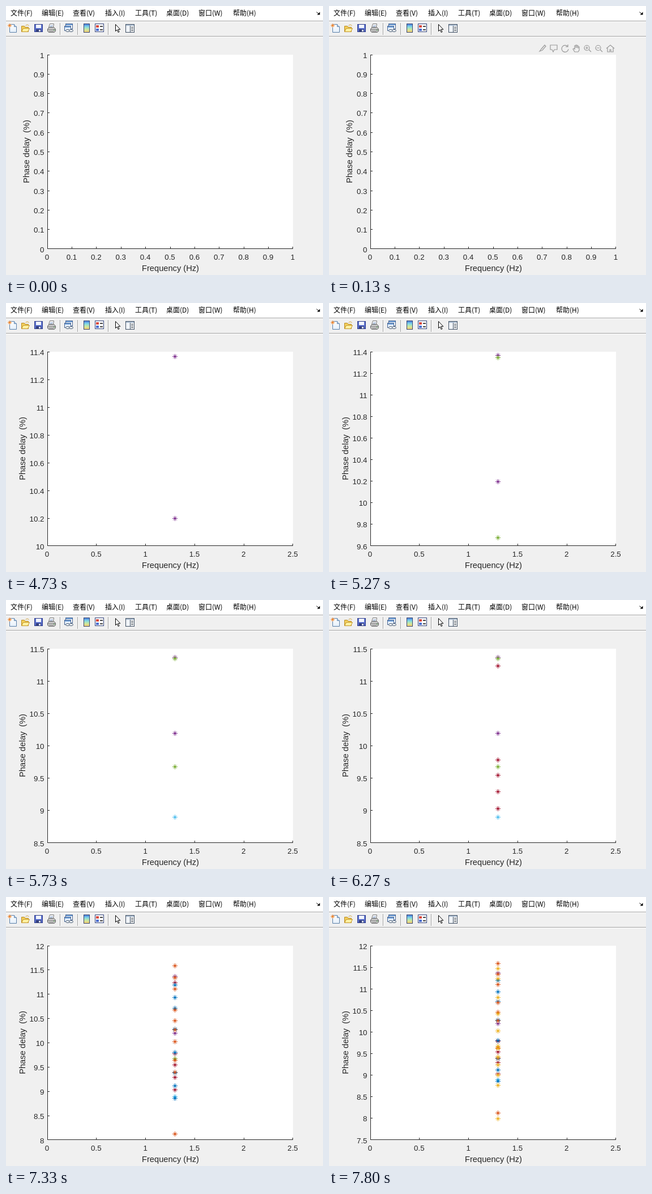
These frames come from a looping animation (560 by 475 pixels, 8000 ms). An HTML page with a canvas:

```html
<!DOCTYPE html>
<html lang="zh">
<head>
<meta charset="utf-8">
<title>Phase delay plot</title>
<style>
html, body { margin: 0; width: 100%; height: 100%; overflow: hidden; background: #f0f0f0; }
canvas { display: block; }
</style>
</head>
<body>
<canvas id="stage" width="560" height="475"></canvas>
<script>
const ctx = document.getElementById('stage').getContext('2d');
const LOOP = 8000;
const INK = '#262626';
const BOX = { x: 73, y: 86, w: 434, h: 343 };
const SANS = '"Liberation Sans", Arial, sans-serif';
const CJK = '"Noto Sans CJK SC", "Noto Sans CJK", "Noto Sans", sans-serif';

// Each series appears at its time and stays; lo, hi and step give the new y axis.
const SERIES = [
  { at: 4730, lo: 10, hi: 11.4, step: 0.2, color: '#7e2f8e', v: [11.367, 10.2] },
  { at: 5270, lo: 9.6, hi: 11.4, step: 0.2, color: '#77ac30', v: [11.35, 9.68] },
  { at: 5730, lo: 8.5, hi: 11.5, step: 0.5, color: '#4dbeee', v: [8.9] },
  { at: 6270, lo: 8.5, hi: 11.5, step: 0.5, color: '#a2142f', v: [11.24, 9.79, 9.55, 9.295, 9.033] },
  { at: 6800, lo: 8.5, hi: 11.5, step: 0.5, color: '#0072bd',
    v: [11.194, 10.94, 10.72, 10.284, 10.03, 9.812, 9.383, 9.121, 8.859] },
  { at: 7330, lo: 8, hi: 12, step: 0.5, color: '#d95319',
    v: [11.59, 11.347, 11.114, 10.682, 10.46, 10.274, 10.03, 9.644, 9.4, 8.128] },
  { at: 7800, lo: 7.5, hi: 12, step: 0.5, color: '#edb120',
    v: [11.475, 11.24, 10.806, 10.426, 10.03, 9.68, 9.626, 9.43, 9.245, 9.01, 8.77, 8] }
];

const MENU = [['文件(F)', 8], ['编辑(E)', 63], ['查看(V)', 118], ['插入(I)', 175],
  ['工具(T)', 228], ['桌面(D)', 283], ['窗口(W)', 340], ['帮助(H)', 401]];

function rect(x, y, w, h, fill, edge) {
  ctx.fillStyle = fill;
  ctx.fillRect(x, y, w, h);
  if (edge) {
    ctx.strokeStyle = edge;
    ctx.lineWidth = 1;
    ctx.strokeRect(x + 0.5, y + 0.5, w - 1, h - 1);
  }
}

function shape(d, fill, edge, width = 1) {
  const p = new Path2D(d);
  if (fill) { ctx.fillStyle = fill; ctx.fill(p); }
  if (edge) { ctx.strokeStyle = edge; ctx.lineWidth = width; ctx.stroke(p); }
}

function text(s, x, y, size, align = 'left', font = SANS, color = INK) {
  ctx.font = size + 'px ' + font;
  ctx.textAlign = align;
  ctx.fillStyle = color;
  ctx.fillText(s, x, y);
}

function gradient(y0, y1, ...colors) {
  const g = ctx.createLinearGradient(0, y0, 0, y1);
  colors.forEach((c, i) => g.addColorStop(i / (colors.length - 1), c));
  return g;
}

function drawMenu() {
  rect(0, 0, 560, 26, '#fff');
  for (const [label, x] of MENU) text(label, x, 17, 12, 'left', CJK, '#000');
  shape('M548.5 10.5L553 14.5', null, '#000');
  shape('M554.5 10.5V15.5H549.5Z', '#000');
}

function drawToolbar() {
  for (const y of [26, 53]) {
    rect(0, y, 560, 1, '#a0a0a0');
    rect(0, y + 1, 560, 1, '#fff');
  }
  for (const x of [95, 126, 180]) {
    rect(x, 30, 1, 21, '#a0a0a0');
    rect(x + 1, 30, 1, 21, '#fff');
  }

  // new page
  shape('M6.5 32.5H14.5L18.5 36.5V46.5H6.5Z', gradient(32, 47, '#fff', '#e4effa'), '#5a7fa8');
  shape('M14.5 32.5V36.5H18.5', '#c5dcf2', '#5a7fa8');
  shape('M3 34.5H10M6.5 31V38M4 32L9 37M9 32L4 37', null, '#ec8a38');

  // folder
  shape('M27.5 45.5V35.5H32.5L34 37.5H39.5V45.5Z', '#f3cf5c', '#b98a1c');
  shape('M27.5 45.5L30.5 39.5H41.5L38.5 45.5Z', '#fff0a0', '#c3952a');
  shape('M34.5 34.5Q37.5 31.5 40.5 34.5', null, '#d1a137');

  // disk
  rect(50, 32, 15, 14, '#5a6fcb', '#2c3a8c');
  rect(53, 33, 9, 6, '#f2f5fd');
  rect(53, 41, 9, 5, '#343f7c');
  rect(58, 42, 3, 3, '#dce3f4');

  // printer
  shape('M75.5 38L77.5 31.5H84.5L83.5 38Z', '#fff', '#777');
  shape('M78 34.5H83M77.5 36.5H82', null, '#8fa9cf');
  shape('M73.5 40.5L76.5 37.5H84.5L87.5 40.5V44.5L85 46.5H75.5L73.5 44.5Z', '#c4c4c4', '#606060');
  shape('M74 41.5H87M76 44.5H84', null, '#8a8a8a');
  rect(84, 42, 2, 1, '#3c9d3c');

  // linked windows
  rect(105, 31, 13, 10, '#fff', '#44618f');
  rect(106, 32, 11, 2, '#6f9fd8');
  rect(103, 35, 12, 9, '#e6f0fb', '#44618f');
  rect(104, 36, 10, 2, '#6f9fd8');
  ctx.strokeStyle = '#46586f';
  for (const x of [109, 115]) {
    ctx.beginPath();
    ctx.ellipse(x, 43.5, 3.5, 2, 0, 0, Math.PI * 2);
    ctx.fillStyle = '#eef2f6';
    ctx.fill();
    ctx.stroke();
  }

  // color bar
  rect(137, 31, 11, 16, gradient(32, 46, '#4a7de0', '#7fd8e6', '#c8e8a0', '#f8cf72'), '#38466e');

  // legend
  rect(157, 31, 16, 15, '#fff', '#35457d');
  rect(159, 34, 5, 4, '#d8473c');
  rect(159, 40, 5, 4, '#4b6fd0');
  rect(166, 35, 5, 2, '#4a4a4a');
  rect(166, 41, 5, 2, '#4a4a4a');

  // pointer
  shape('M193.5 32.5V44.5L196.2 42L198.2 46.5L200 45.7L198 41.3H201.8Z', '#fff', '#000');

  // inspector
  rect(211, 32, 16, 15, '#fff', '#3f4f63');
  rect(212, 33, 14, 2, '#aebfd2');
  rect(212, 35, 7, 11, '#f0f3f7');
  rect(219, 35, 1, 11, '#3f4f63');
  for (const y of [37, 40, 43]) rect(221, y, 4, 1, '#26313d');
}

// Hover tools above the axes, fading in two steps.
function drawHoverTools(t) {
  if (t < 130 || t >= 530) return;
  const icons = [
    'M3 13L6 9L12 2L14 4L8 11Z',
    'M2 2H14V10H9L7 14L5 10H2Z',
    'M13 5A6 6 0 1 0 14 9M13 1V5H9',
    'M5 14L2 9L4 8L5 9V3H7V7V2H9V7V3H11V8V5H13V11L11 14Z',
    'M11 7A4.5 4.5 0 1 1 2 7A4.5 4.5 0 1 1 11 7M10 10L14 14M4 7H9M6.5 4.5V9.5',
    'M11 7A4.5 4.5 0 1 1 2 7A4.5 4.5 0 1 1 11 7M10 10L14 14M4 7H9',
    'M1 8L8 2L15 8M3 7V14H7V10H9V14H13V7'
  ];
  ctx.save();
  ctx.globalAlpha = t < 400 ? 0.6 : 0.3;
  ctx.translate(369, 67);
  for (const d of icons) {
    shape(d, null, '#606060', 1.2);
    ctx.translate(20, 0);
  }
  ctx.restore();
}

function ticks(lo, hi, step) {
  const n = Math.round((hi - lo) / step);
  return Array.from({ length: n + 1 }, (_, i) => [i / n, String(+(lo + i * step).toFixed(1))]);
}

function drawAxes(y, xMax, xStep, labelX) {
  const bottom = BOX.y + BOX.h, right = BOX.x + BOX.w;
  rect(BOX.x, BOX.y, BOX.w, BOX.h, '#fff');
  rect(BOX.x, BOX.y, 1, BOX.h, INK);
  rect(BOX.x, bottom - 1, BOX.w, 1, INK);
  for (const [k, label] of ticks(0, xMax, xStep)) {
    const x = BOX.x + k * BOX.w;
    rect(Math.min(Math.floor(x), right - 1), bottom - 4, 1, 3, INK);
    text(label, x - 0.5, 448, 13.33, 'center');
  }
  for (const [k, label] of ticks(y.lo, y.hi, y.step)) {
    const py = Math.floor(bottom - k * BOX.h);
    rect(BOX.x + 1, Math.min(py, bottom - 1), 3, 1, INK);
    text(label, 67.5, py + 6, 13.33, 'right');
  }
  text('Frequency (Hz)', 290.5, 468, 14.67, 'center');
  ctx.save();
  ctx.translate(labelX, 257);
  ctx.rotate(-Math.PI / 2);
  text('Phase delay\u00a0 (%)', 0, 0, 14.67, 'center');
  ctx.restore();
}

function star(x, y, color) {
  ctx.save();
  ctx.translate(x, y);
  shape('M-4.5 0H4.5M0 -4.5V4.5M-3 -3L3 3M3 -3L-3 3', null, color);
  ctx.restore();
}

function draw(t) {
  const shown = SERIES.filter(s => t >= s.at);
  rect(0, 0, 560, 475, '#f0f0f0');
  drawMenu();
  drawToolbar();
  if (!shown.length) {
    drawAxes({ lo: 0, hi: 1, step: 0.1 }, 1, 0.1, 41);
    drawHoverTools(t);
    return;
  }
  const axis = shown[shown.length - 1];
  drawAxes(axis, 2.5, 0.5, 34);
  for (const s of shown) {
    for (const v of s.v) {
      const y = BOX.y + (axis.hi - v) / (axis.hi - axis.lo) * BOX.h;
      star(298.5, Math.round(y) + 0.5, s.color);
    }
  }
}

const start = performance.now();
function tick() {
  draw((performance.now() - start) % LOOP);
  requestAnimationFrame(tick);
}
tick();
</script>
</body>
</html>
```
